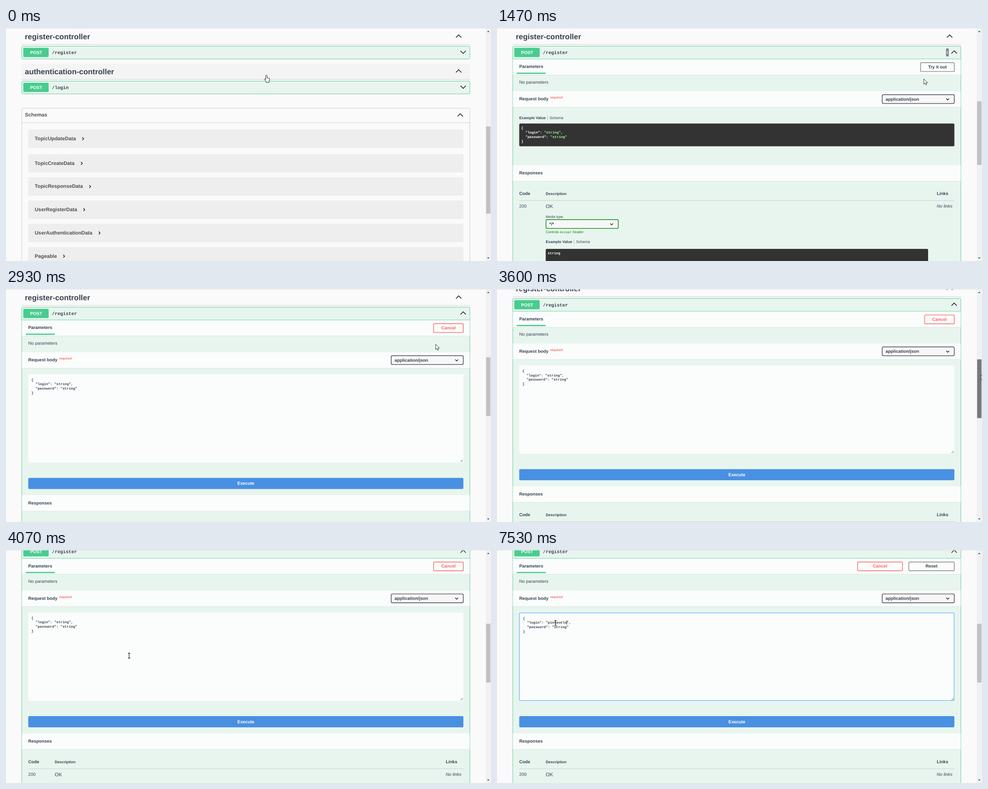
These frames come from a looping animation (1080x519 px, 8 s). An HTML page:

```html
<!DOCTYPE html>
<html lang="en">
<head>
<meta charset="utf-8">
<title>API console</title>
<style>
  html, body { margin: 0; width: 100%; height: 100%; overflow: hidden; background: #fafafa; }
  svg { display: block; width: 1080px; height: 519px; }
  text { font: 9.84px "Liberation Sans", Arial, sans-serif; fill: #3b4151; white-space: pre; text-rendering: geometricPrecision; }
  .b { font-weight: bold; }
  .i { font-style: italic; }
  .mid { text-anchor: middle; }
  .mono { font-family: "Liberation Mono", "DejaVu Sans Mono", monospace; font-weight: bold; }
  .schema { fill: #505050; }
  .str { fill: #a2fca2; }
  .white { fill: #fff; }
  .red { fill: #ff6060; }
  .required { fill: #f00; fill-opacity: .6; }
  .hint { fill: #080; }
  .code { font: 7.22px "Liberation Mono", monospace; }
  .btn { fill: none; stroke: #808080; stroke-width: 1.4; }
  .btn.cancel { stroke: #ff6060; }
  .line { fill: #3b4151; fill-opacity: .3; }
  .chev { fill: none; stroke: #000; stroke-width: 1.3; }
</style>
</head>
<body>
<svg id="stage" viewBox="0 0 1080 519"></svg>
<script>
const GREEN = '#49cc90', LOOP = 8000, CHAR = 4.638, PITCH = 77.8;
const LOGIN = 'pintavelo';

// Drawing helpers
const rect = (x, y, w, h, attrs = '') => `<rect x="${x}" y="${y}" width="${w}" height="${h}" ${attrs}/>`;
const text = (x, y, str, size = 9.84, cls = '') =>
  `<text x="${x}" y="${y}" class="${cls}" style="font-size:${size}px">${str}</text>`;
const bold = (x, y, str, size) => text(x, y, str, size, 'b');
const mono = (x, y, str, cls = '', size = 7.73) => text(x, y, str, size, 'mono ' + cls);
const group = (id, ...parts) => `<g id="${id}">${parts.join('')}</g>`;
const chevron = (x, y, w = 6, h = 3) => `<path class="chev" d="M${x - w} ${y + h}L${x} ${y - h}L${x + w} ${y + h}"/>`;
const fill = (color, radius = 0) => `fill="${color}" rx="${radius}"`;

const heading = (y, title) =>
  bold(42, y + 24.8, title, 16.875) + rect(34.8, y + 36.2, 998.4, .7, 'class="line"') + chevron(1008, y + 18.2);

const block = (y, height) =>
  rect(35.15, y + 40.6, 997.7, height, 'fill="none" stroke="#000" stroke-opacity=".05" stroke-width="2.6" rx="2.8"') +
  rect(35.15, y + 40.6, 997.7, height, `fill="#e8f5ef" stroke="${GREEN}" stroke-width=".8" rx="2.8"`);

const summary = (y, path) =>
  rect(38.5, y + 44.2, 56.5, 20.6, fill(GREEN, 2.1)) +
  text(67.2, y + 58.1, 'POST', 9.84, 'b mid white') + mono(102.3, y + 58.1, path, '', 10.31);

const bar = (y, h) =>
  rect(35.5, y + h, 997, 1, 'fill="#d6e2dd"') + rect(35.5, y, 997, h, 'fill="#fafdfc"');

const tabs = (x, y) =>
  bold(x, y, 'Example Value', 8.44) + rect(x + 62.7, y - 8, .7, 10.5, 'fill="#3b4151" opacity=".45"') +
  text(x + 67.4, y, 'Schema', 8.44);

const select = (x, y, w, label, border) =>
  rect(x, y + .7, w, 20, 'fill="#000" opacity=".15" rx="2.8"') +
  rect(x, y, w, 19.6, `fill="#f7f7f7" stroke="${border}" stroke-width="1.4" rx="2.8"`) +
  bold(x + 7.6, y + 13.2, label) + chevron(x + w - 14.7, y + 10.2, 3.2, -1.6);

const model = ([name, y, arrowX]) =>
  rect(49.5, y, 969, 41, fill('#eee', 2.8)) + text(64, y + 23.8, name, 11.25, 'b schema') +
  `<path class="chev" d="M${arrowX - 1.5} ${y + 17.5}l3 3.2l-3 3.2"/>`;

const button = (id, x, w, label, color = '') =>
  group(id, rect(x, 77.3, w, 19.6, `class="btn ${color}" rx="2"`),
    text(x + w / 2, 90, label, 9.84, `b mid ${color && 'red'}`));

// Page parts
const models = [['TopicUpdateData', 226, 171.5], ['TopicCreateData', 281, 168.5], ['TopicResponseData', 332.5, 187],
  ['UserRegisterData', 384, 174], ['UserAuthenticationData', 436, 208], ['Pageable', 487.7, 129]];

const closed = group('closed',
  block(0, 28.3), summary(0, '/register'), chevron(1018, 53.7, 6, -3),
  rect(34.8, 79, 998.4, 35.5, 'id="headHover" fill="#000" opacity=".024"'),
  heading(PITCH, 'authentication-controller'),
  block(PITCH, 28.3), summary(PITCH, '/login'), chevron(1018, 53.7 + PITCH, 6, -3),
  rect(35.15, 178.8, 997.7, 400, 'fill="none" stroke="#3b4151" stroke-opacity=".3" stroke-width=".8" rx="2.8"'),
  text(42.3, 196.7, 'Schemas', 11.25, 'b schema'), rect(35, 210.8, 998, .7, 'class="line"'), chevron(1011.5, 194),
  models.map(model).join(''));

const example = group('example',
  button('tryOut', 943.2, 75.1, 'Try it out'),
  tabs(49.5, 202.6),
  rect(49.5, 212.8, 969, 50.7, fill('#333', 2.8)),
  mono(54, 225, '{', 'white'),
  mono(54, 235, '  "login": <tspan class="str">"string"</tspan>,', 'white'),
  mono(54, 245, '  "password": <tspan class="str">"string"</tspan>', 'white'),
  mono(54, 255.4, '}', 'white'));

const editor = group('editor',
  button('cancel', 952.2, 66.1, 'Cancel', 'cancel'), button('reset', 883, 135.3, 'Reset'),
  rect(49.5, 190, 969, 196.8, 'fill="#fafdfc" rx="2.8"'),
  rect(50.1, 190.7, 967.8, 195.2, 'id="focusRing" fill="none" stroke="#61affe" stroke-width="1.3" rx="2.2"'),
  '<path d="M1011.8 385l5-5m-2 5l2-2" stroke="#555" stroke-width=".9"/>',
  group('json',
    rect(56.5 + 12 * CHAR, 206.2, 6 * CHAR, 9.8, 'id="selection" fill="#0078d7"'),
    mono(56.5, 204.6, '{'),
    mono(56.5, 214, '  "login": "<tspan id="login">string</tspan>",'),
    mono(56.5, 223.6, '  "password": "string"'), mono(56.5, 233.6, '}'),
    rect(0, 206.2, .8, 9.6, 'id="caret"')),
  rect(49.5, 420.7, 969, 24.8, fill('#4990e2', 2.8)),
  text(534.2, 436.4, 'Execute', 9.84, 'b mid white'));

const responses = group('responses',
  bar(305.5, 35.2), bold(49.5, 326.2, 'Responses'),
  bold(49.5, 372.1, 'Code'), bold(108.5, 372.1, 'Description', 8.44), bold(979.2, 372.1, 'Links'),
  rect(49.5, 383.8, 969, .7, 'class="line"'),
  text(49.5, 400.1, '200'), text(108.5, 401, 'OK', 11.25), text(979.2, 400.1, 'No links', 9.84, 'i'),
  text(108.5, 422.8, 'Media type', 7.875), select(109, 426.8, 161, '*/*', '#080'),
  text(108.5, 456.8, 'Controls <tspan class="code">Accept</tspan> header.', 7.875, 'hint'),
  tabs(108.5, 479),
  rect(108.5, 492, 851.5, 60, fill('#333', 2.8)), mono(113, 504.4, 'string', 'white'));

const opened = group('opened',
  block(0, 900), summary(0, '/register'), chevron(1018, 53.7),
  bar(69, 35.2), rect(35.5, 68.6, 997, .8, `fill="${GREEN}"`),
  bold(49.5, 89.4, 'Parameters'), rect(44, 99.4, 64.5, 2.8, `fill="${GREEN}"`),
  text(49.5, 123.8, 'No parameters'),
  bar(141, 35), bold(49.5, 161.4, 'Request body'),
  text(118.2, 157.2, 'required', 7.03, 'b required'),
  select(857.7, 148.5, 160.6, 'application/json', '#41444e'),
  example, editor, responses);

const copyIcon = group('copy',
  rect(0, 45.3, 0, 18.3, 'id="copyBox" fill="#7d8293" rx="2.8"'),
  rect(0, 51, 0, 7, 'id="copyGlyph" fill="#b9bcc6"'));

const scrollbar =
  rect(1068, 0, 12, 519, 'fill="#f1f1f1"') + rect(1069.2, 0, 9.6, 0, 'id="thumb"') +
  '<path d="M1071.2 9l2.7-3l2.7 3zM1071.2 511l2.7 3l2.7-3z" fill="#505050"/>' +
  rect(0, 0, 1080, .9, 'fill="#e4e4e4"');

const cursors = group('cursor',
  '<path id="hand" d="M-1.5 1Q0-1.5 1.5 1V6L6 7Q7.3 7.4 7 9.5L6 13V16H-1V14L-4.5 9.5Q-4.5 7.8-3 8.2L-1.5 9.6Z" fill="#fff" stroke="#000" stroke-width=".9"/>',
  '<path id="arrow" d="M0 0V11.6L2.7 9.2L4.5 13.2L6.4 12.3L4.7 8.5H8.3Z" fill="#fff" stroke="#000" stroke-width=".8"/>',
  '<path id="beam" d="M-2.5-5.5H-.6L0-5L.6-5.5H2.5M0-5V5M-2.5 5.5H-.6L0 5L.6 5.5H2.5" fill="none" stroke="#000" stroke-width="1.1"/>');

document.getElementById('stage').innerHTML =
  group('page', heading(0, 'register-controller'), closed, opened, copyIcon) + scrollbar + cursors;

// Motion
const el = id => document.getElementById(id);
const set = (id, attrs) => { for (const k in attrs) el(id).setAttribute(k, attrs[k]); };
const show = (id, on) => { el(id).style.display = on ? '' : 'none'; };
const clamp = v => Math.max(0, Math.min(1, v));

// CSS "ease": cubic-bezier(.25, .1, .25, 1)
function ease(p) {
  p = clamp(p);
  let lo = 0, hi = 1, s = .5;
  for (let i = 0; i < 16; i++) {
    s = (lo + hi) / 2;
    if (.75 * s * (1 - s) + s ** 3 < p) lo = s; else hi = s;
  }
  return .3 * s * (1 - s) ** 2 + 3 * s * s * (1 - s) + s ** 3;
}

// Linear interpolation through [time, ...values] points
function along(points, t) {
  const n = points.findIndex(p => p[0] > t);
  if (n < 1) return points[n < 0 ? points.length - 1 : 0].slice(1);
  const [a, b] = [points[n - 1], points[n]], k = (t - a[0]) / (b[0] - a[0]);
  return a.slice(1).map((v, i) => v + (b[i + 1] - v) * k);
}

const mousePath = [
  [70, 580, 105], [450, 720, 60], [870, 900, 56], [1000, 900, 56], [1320, 938, 69], [1470, 950.5, 113.5],
  [1800, 962, 93], [2130, 968, 87], [2670, 964, 89], [2930, 956.5, 123], [3330, 1077, 188], [3470, 1077, 187],
  [3600, 1078, 191], [3740, 1077, 199], [4070, 274.3, 235.5], [4330, 245, 214], [4730, 130.3, 162.5]];
const scrollPath = [[3470, 0], [3600, 19.2], [3735, 50.6]];
const keyTimes = [6190, 6325, 6460, 6590, 7060, 7260, 7320, 7460, 7520];

function layoutButton(id, x, w) {
  const [box, label] = el(id).children;
  box.setAttribute('x', x);
  box.setAttribute('width', w);
  label.setAttribute('x', x + w / 2);
}

function draw(t) {
  const isOpen = t >= 995, editing = t >= 2130, focused = t >= 4920;
  const typed = keyTimes.filter(k => t >= k).length;
  const selected = t >= 5190 && !typed;
  const [scroll] = along(scrollPath, t);

  set('page', { transform: `translate(0 ${-scroll})` });
  show('closed', !isOpen);
  show('opened', isOpen);
  show('headHover', t < 290);
  show('example', !editing);
  show('editor', editing);
  set('responses', { transform: `translate(0 ${editing ? 153.6 : 0})` });

  const copyWidth = 12.7 * (t < 1320 ? ease((t - 400) / 500) : 1 - ease((t - 1320) / 500));
  set('copyBox', { x: 1006 - copyWidth, width: copyWidth });
  set('copyGlyph', { x: 1006 - copyWidth * .75, width: copyWidth / 2 });

  // Cancel moves aside for Reset after the first key
  const grow = 33.8 * ease((t - 6200) / 300);
  layoutButton('cancel', typed ? 802.9 : 952.2, 66.1 + (typed ? grow : 0));
  layoutButton('reset', 883.2 + grow, 135.1 - grow);
  show('reset', typed);

  show('focusRing', focused);
  set('json', { transform: focused ? 'translate(1.2 1)' : '' });
  el('login').textContent = typed ? LOGIN.slice(0, typed) : 'string';
  el('login').style.fill = selected ? '#fff' : '';
  show('selection', selected);
  show('caret', typed);
  set('caret', { x: 56.5 + (12 + typed) * CHAR });

  const [top, bottom] = editing ? [152, 282.8] : isOpen ? [163.3, 305] : [219.3, 413.5];
  const shade = t >= 3470 && t < 3760 ? '#787878' : t >= 3300 && t < 3830 ? '#a8a8a8' : '#c1c1c1';
  set('thumb', { y: top + scroll * .243, height: bottom - top, fill: shade });

  const [x, y] = along(mousePath, t);
  const pointer = t < 1320 || (t > 1740 && t < 2730) ? 'hand' : t > 3740 && x < 1019 ? 'beam' : 'arrow';
  for (const id of ['hand', 'arrow', 'beam']) show(id, id === pointer);
  set('cursor', { transform: `translate(${x} ${y})` });
}

const start = performance.now();
function tick() {
  draw((performance.now() - start) % LOOP);
  requestAnimationFrame(tick);
}
tick();
</script>
</body>
</html>
```
